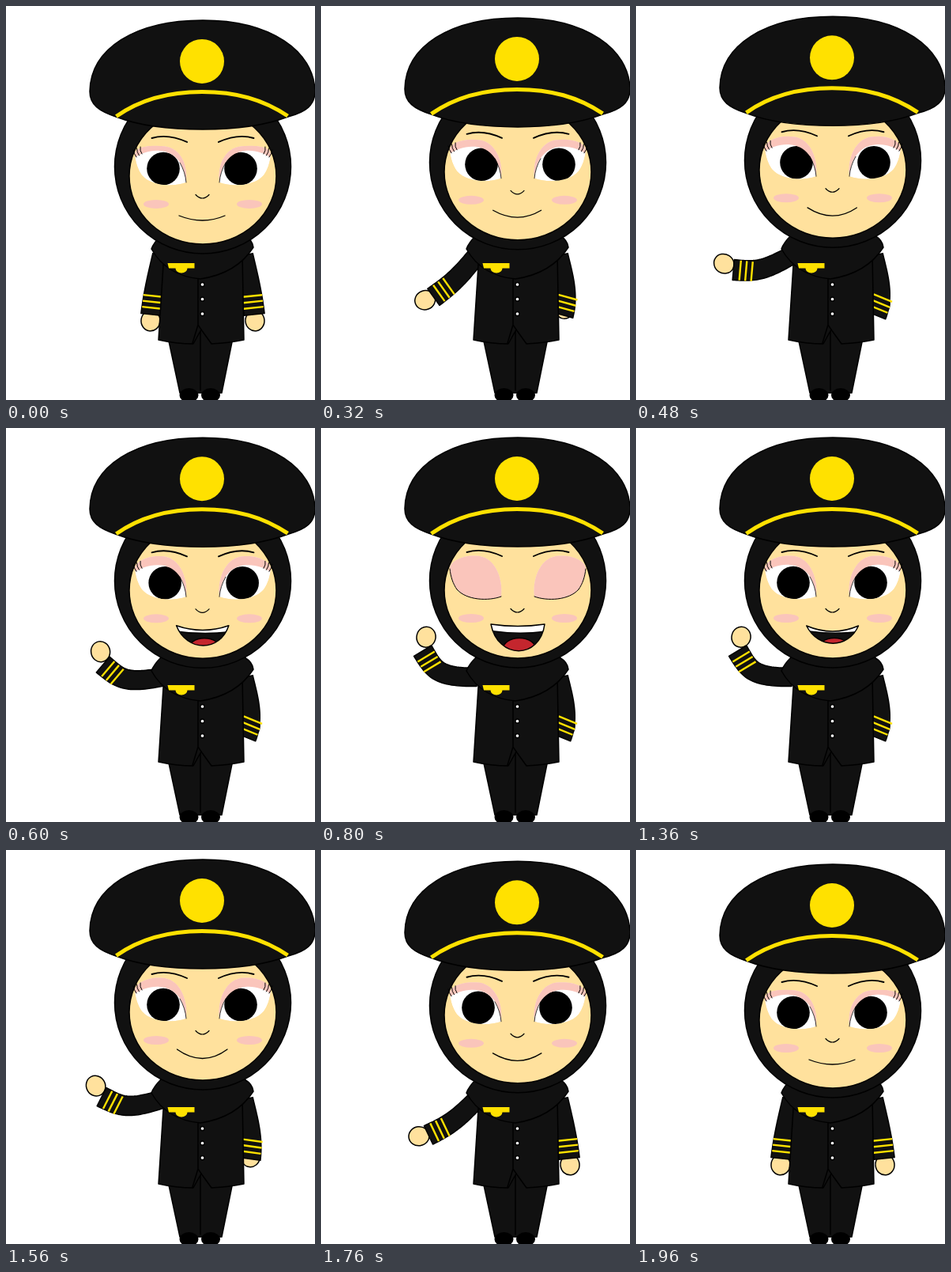
An HTML page with a canvas for the animation above (2000 ms loop, 391 by 498 pixels).

```html
<!DOCTYPE html>
<html lang="en">
<head>
<meta charset="utf-8">
<title>Waving pilot</title>
<style>
html, body { margin: 0; width: 100%; height: 100%; overflow: hidden; background: #fff; }
canvas { display: block; }
</style>
</head>
<body>
<canvas id="stage" width="391" height="498"></canvas>
<script>
const LOOP = 2000;
const CLOTH = '#111', SKIN = '#ffe19d', PINK = '#fac5bb', GOLD = '#ffe100';
const ctx = document.getElementById('stage').getContext('2d');
ctx.lineJoin = ctx.lineCap = 'round';

const mix = (a, b, k) => a + (b - a) * k;
const ramp = (t, from, to) => Math.min(1, Math.max(0, (t - from) / (to - from)));
// Rises from 0 to 1 between a and b, falls back between c and d.
const pulse = (t, a, b, c, d) => ramp(t, a, b) - ramp(t, c, d);

function shape(d, fill, stroke = '#000', width = 1.5) {
  const p = d instanceof Path2D ? d : new Path2D(d);
  if (fill) { ctx.fillStyle = fill; ctx.fill(p); }
  if (stroke) { ctx.strokeStyle = stroke; ctx.lineWidth = width; ctx.stroke(p); }
}

function oval(x, y, rx, ry, fill, stroke = null, turn = 0) {
  const p = new Path2D();
  p.ellipse(x, y, rx, ry, turn, 0, Math.PI * 2);
  shape(p, fill, stroke);
}

function layer(draw) {
  ctx.save();
  draw();
  ctx.restore();
}

function mirrored(draw) {
  layer(() => {
    ctx.translate(498, 0);
    ctx.scale(-1, 1);
    draw();
  });
}

// Steps from a point; bearing 0 is straight down, 90 is to the left.
function step([x, y], bearing, length) {
  const a = bearing * Math.PI / 180;
  return [x - Math.sin(a) * length, y + Math.cos(a) * length];
}

// The wrist circles the shoulder; upper and fore set how the sleeve leaves and ends.
function arm({ reach, upper, bend, fore, turn, grip }) {
  const shoulder = [197, 315];
  const wrist = step(shoulder, reach, 76);
  const curve = [shoulder, step(shoulder, upper, bend), step(wrist, fore, -28), wrist];
  const hand = step(wrist, fore + turn, grip);
  oval(...hand, 12, 13, SKIN, '#000', (fore + turn) * Math.PI / 180);

  const near = [], far = [];
  for (let u = 0; u <= 1; u += 1 / 32) {
    const v = 1 - u, [p, q, r, s] = curve;
    const at = i => v * v * v * p[i] + 3 * v * v * u * q[i] + 3 * v * u * u * r[i] + u * u * u * s[i];
    const slope = i => v * v * (q[i] - p[i]) + 2 * v * u * (r[i] - q[i]) + u * u * (s[i] - r[i]);
    const k = mix(11.5, 13, u) / Math.hypot(slope(0), slope(1));
    const nx = -slope(1) * k, ny = slope(0) * k;
    near.push([at(0) + nx, at(1) + ny]);
    far.unshift([at(0) - nx, at(1) - ny]);
  }
  shape('M' + near.concat(far).join('L') + 'Z', CLOTH);

  layer(() => {
    ctx.translate(...wrist);
    ctx.rotate(fore * Math.PI / 180);
    ctx.lineCap = 'butt';
    for (let i = 1; i <= 3; i++) shape(`M-12.500 ${-1 - 7.5 * i}H12.500`, null, GOLD, 2.4);
  });
}

function body(t) {
  const wave = ramp(t, 0, 660) ** 1.5 * (1 - ramp(t, 1400, 1960) ** 1.2);
  const tuck = pulse(t, 0, 420, 1440, 1680);
  arm({ reach: 10 + 106 * wave, upper: 12 + 78 * wave, bend: 25 + 25 * wave,
    fore: 6 + 143 * wave, turn: 45 * wave, grip: 8 + 10 * wave });
  mirrored(() => arm({ reach: 10 - 8 * tuck, upper: 12, bend: 25,
    fore: 6 - 28 * tuck, turn: 0, grip: 8 - 22 * tuck }));

  shape('M202 405L220 489H273L290 405Z', CLOTH);
  shape('M246 410V486');
  for (const x of [231.5, 259]) oval(x, 492, 12, 9, '#000');
  shape('M200 312L193 422Q215 427 237 427L247 409L260 427Q282 426 301 422L299 312Z', CLOTH);
  shape('M243 344V403L236 426M243 403L247 409');
  for (let i = 0; i < 3; i++) oval(248.5, 352 + 18.5 * i, 2.6, 2.6, '#fff', '#000');
  shape('M196 290Q187 299 184 307Q203 341 246 345Q292 338 313 305Q312 296 302 290Z', CLOTH);
  shape('M204.500 325H238.500V331.500H229.500A7.500 6 0 0 1 214.500 331.500H206Z', GOLD, null);
}

function eye(glance, blink, raise) {
  const top = mix(177, 171.5, raise);
  const lower = 'M172 214C184 228 212 229 228 223';
  const socket = new Path2D(`${lower}C231 197 218 ${top - 1} 195 ${top}C180 ${top - 1} 163 178 163 188C164 198 167 207 172 214Z`);
  layer(() => {
    ctx.clip(socket);
    shape(socket, '#fff', null);
    oval(200 + glance, 205.5, 20.8, 20.8, '#000');
    ctx.translate(0, blink * 45);
    shape('M150 120H240V223H228C226 200 215 185 195 183C182 182 172 186 164 191H150Z', PINK, null);
  });
  layer(() => {
    ctx.globalAlpha = blink;
    shape(lower + 'M163 188C164 198 167 207 172 214', null, '#000', 1);
    ctx.globalAlpha = 1 - blink;
    shape('M228 223Q227 210 220 198', null, '#000', 0.8);
    for (let i = 0; i < 3; i++) shape(`M${165 + 3.5 * i} ${191 - 2 * i}q-3-4-${4 - i}-9`, null, '#000', 1);
  });
}

function mouth(smile, laugh) {
  const left = mix(mix(219, 216.5, smile), 215, laugh);
  const right = mix(mix(277, 280, smile), 283, laugh);
  const corner = mix(mix(265, 262, smile), 258, laugh);
  const bend = mix(277, 285, smile);
  const lip = `M${left} ${corner}Q249 ${mix(bend, 263, laugh)} ${right} ${corner}`;
  if (!laugh) return shape(lip, null, '#000', 1.3);

  const low = mix(mix(corner, bend, 2 / 3), 303, laugh);
  const open = new Path2D(`${lip}C${mix(260, 277, laugh)} ${low} ${mix(237, 224, laugh)} ${low} ${left} ${corner}Z`);
  layer(() => {
    ctx.clip(open);
    shape(open, CLOTH, null);
    oval(251, 290, 21, 14.5, '#c4262e', '#000');
    shape('M205 245H292V266Q250 273 205 265Z', '#fff');
  });
  shape(open, null);
}

function head(t, lift) {
  const glance = 4 * pulse(t, 0, 250, 500, 720) - 1;
  const blink = pulse(t, 640, 760, 920, 1040);
  const laugh = pulse(t, 500, 660, 1280, 1440);
  layer(() => {
    ctx.translate(0, -10 * lift);
    oval(249, 203, 111.5, 110, CLOTH, '#000');
    oval(249, 215, 93, 86, SKIN, '#000');
    const half = look => {
      oval(190, 250.5, 16, 5.5, PINK);
      eye(look, blink, lift);
      shape('M184.500 167Q205 161 229 172', null, '#000', 1.9);
    };
    half(glance);
    mirrored(() => half(-glance));
    shape('M240 238.500Q248.500 247.500 257 238.500', null, '#000', 1.2);
    mouth(lift, laugh);
  });
}

function cap(lift) {
  layer(() => {
    ctx.translate(0, -6 * lift);
    shape('M106 108C107 54 163 18 249 18C335 18 390 57 391 108C391 125 380 134 357 140' +
      'C325 152 285 156 249 156C205 156 165 150 139 140C118 133 106 125 106 108Z', CLOTH);
    ctx.lineCap = 'butt';
    shape('M139.500 139.500C170 118 205 108.500 248 108.500S325 118 356.500 139', null, GOLD, 5);
    oval(248, 70, 28, 28, GOLD);
  });
}

function frame(now) {
  const t = now % LOOP;
  const lift = pulse(t, 0, 620, 1640, 1960);
  ctx.fillStyle = '#fff';
  ctx.fillRect(0, 0, 391, 498);
  body(t);
  head(t, lift);
  cap(lift);
  requestAnimationFrame(frame);
}
frame(performance.now());
</script>
</body>
</html>
```
